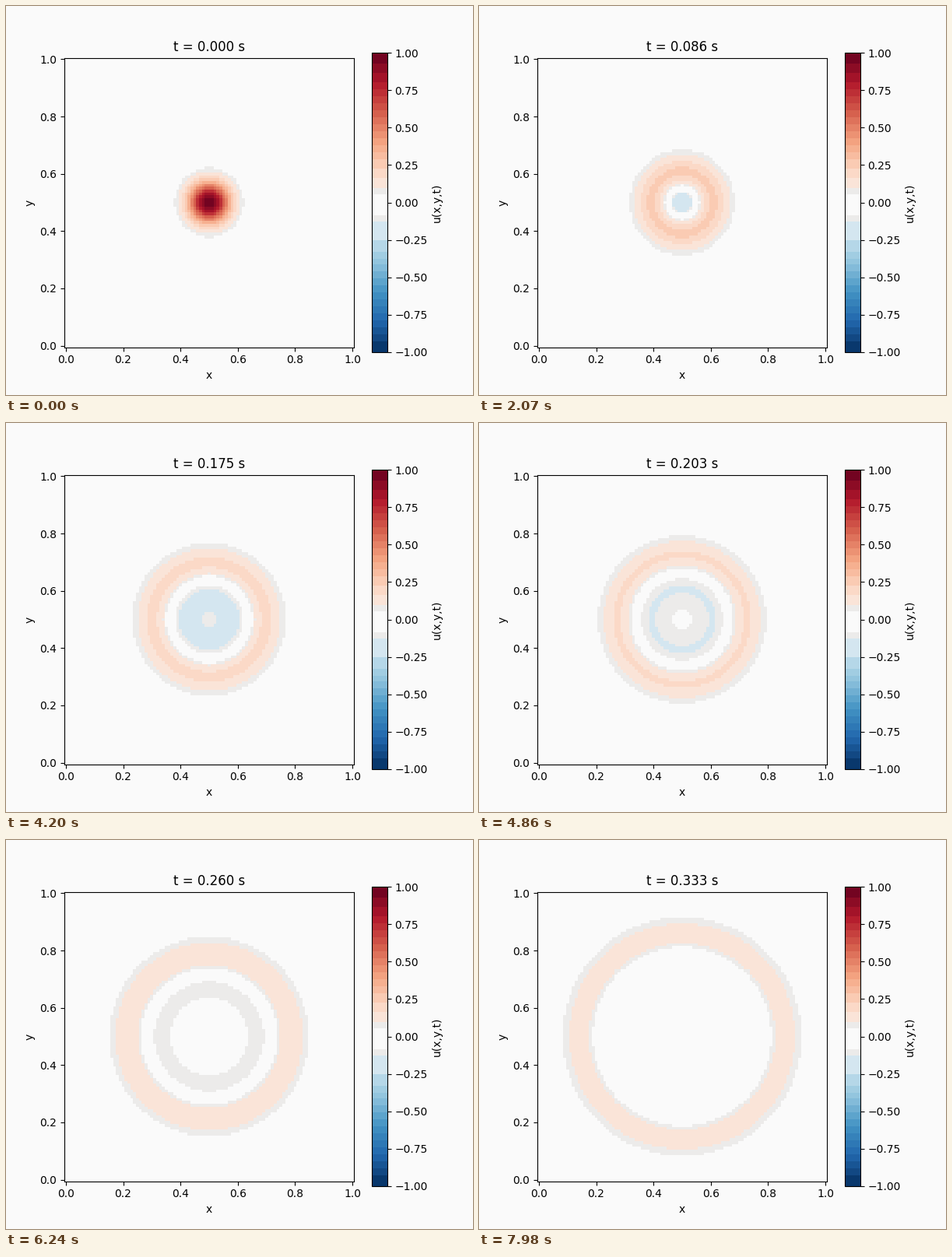
Write a matplotlib script that moves like this. It is 600x500 px and loops after 8000 ms.

```python
import numpy as np
import matplotlib.pyplot as plt
from matplotlib.animation import FuncAnimation
from matplotlib.colors import ListedColormap

FRAMES = 267
LOOP_MS = 8000
N = 101
DX = 1 / (N - 1)
DT = 0.00125
SIGMA = 0.05
PAPER = "#fafafa"

# Edges of the flat colour bands, in 256ths of the value range
EDGES = [0, 9, *range(15, 80, 6), 80, 86, 96, 112, 117, 135, 140, 149, 157,
         *range(165, 232, 6), 239, 247, 256]
PALE = {96: "#d4e6f0", 112: "#ecebea", 117: PAPER, 135: "#ecebea",
        140: "#fae4d8", 149: "#fbd9c7"}


def banded_cmap():
    base = plt.get_cmap("RdBu_r")(np.arange(256))
    for lo, hi in zip(EDGES, EDGES[1:]):
        if lo in PALE:
            base[lo:hi] = plt.matplotlib.colors.to_rgba(PALE[lo])
        else:
            base[lo:hi] = base[lo:hi].mean(axis=0)
    return ListedColormap(base)


def laplacian(u):
    lap = np.zeros_like(u)
    lap[1:-1, 1:-1] = (u[2:, 1:-1] + u[:-2, 1:-1] + u[1:-1, 2:]
                       + u[1:-1, :-2] - 4 * u[1:-1, 1:-1])
    return lap


def solve_wave(u, steps):
    """Leapfrog solution of u_tt = laplace(u), starting at rest."""
    k = (DT / DX) ** 2
    states = [u, u + 0.5 * k * laplacian(u)]
    while len(states) < steps:
        prev, cur = states[-2:]
        states.append(2 * cur - prev + k * laplacian(cur))
    return states


x = np.linspace(0, 1, N)
X, Y = np.meshgrid(x, x)
pulse = np.exp(-((X - 0.5) ** 2 + (Y - 0.5) ** 2) / (2 * SIGMA ** 2))
states = solve_wave(pulse, FRAMES)

fig, ax = plt.subplots(figsize=(6, 5), dpi=100, facecolor=PAPER)
mesh = ax.pcolormesh(X, Y, pulse, cmap=banded_cmap(), vmin=-1, vmax=1,
                     shading="nearest")
ax.set_aspect("equal")
ax.set_xlabel("x")
ax.set_ylabel("y")
title = ax.set_title("t = 0.000 s")
fig.colorbar(mesh, ax=ax, label="u(x,y,t)")


def update(i):
    mesh.set_array(states[i])
    title.set_text(f"t = {i * DT + 1e-9:.3f} s")
    return mesh, title


anim = FuncAnimation(fig, update, frames=FRAMES, interval=LOOP_MS / FRAMES,
                     init_func=lambda: update(0), repeat=True,
                     repeat_delay=0, blit=False)
plt.show()
```
